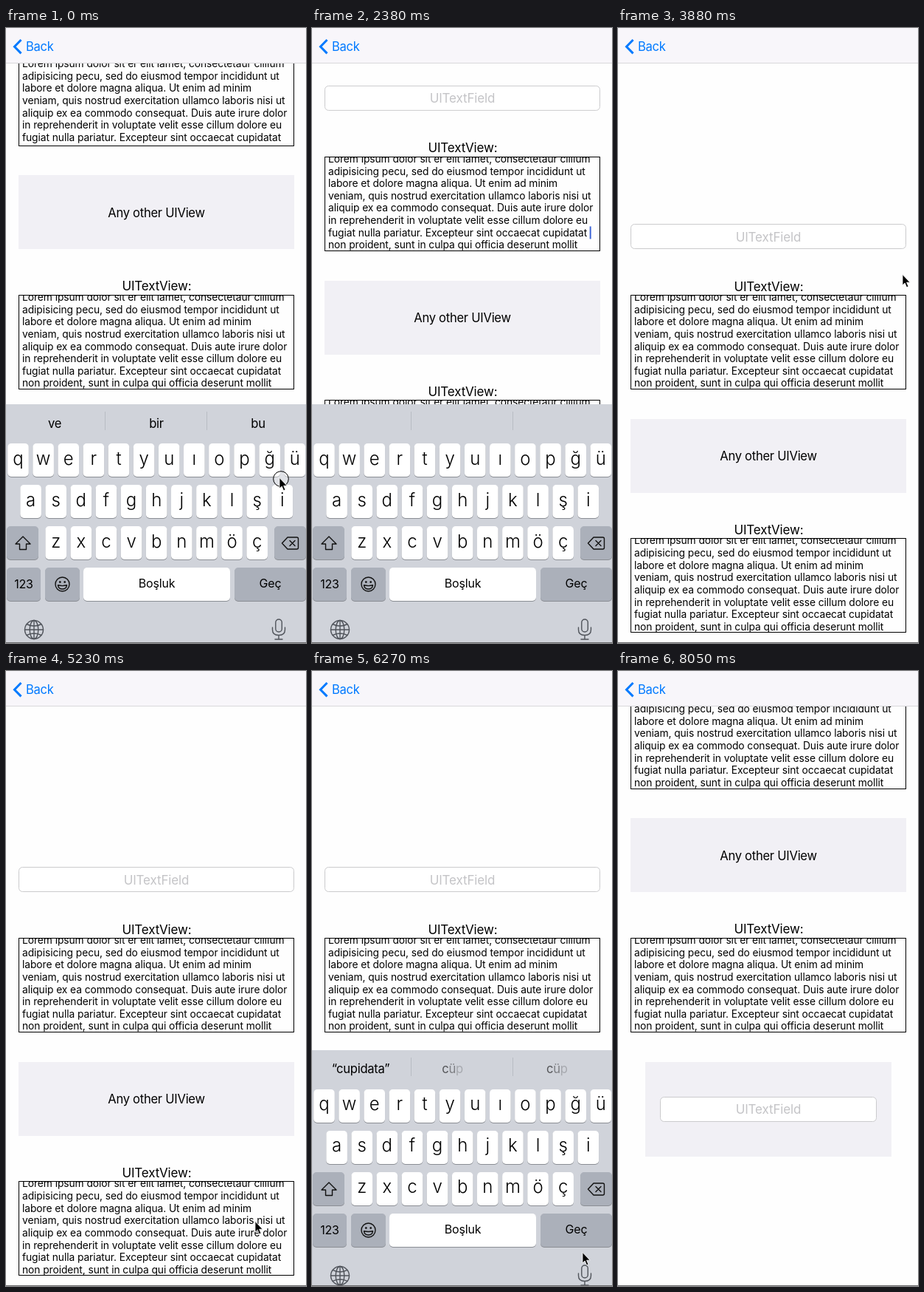
These frames come from a looping animation (407 px wide and 832 px high, 9.39 s). An HTML page:

```html
<!DOCTYPE html>
<html lang="en">
<head>
<meta charset="utf-8">
<style>
  html, body { margin: 0; width: 100%; height: 100%; overflow: hidden; background: #fefefe; }
  svg { display: block; width: 407px; height: 832px; font-family: Inter, Roboto, sans-serif; }
  .ui { font-size: 16.6px; letter-spacing: -.28px; }
  .label { font-size: 17px; letter-spacing: -.13px; }
  .body { font-size: 13.8px; letter-spacing: -.07px; }
  .cap { font-size: 24px; font-weight: 350; }
  .small { font-size: 16px; letter-spacing: -.15px; }
  .line { fill: none; stroke: #111; stroke-width: 1.4; stroke-linejoin: round; stroke-linecap: round; }
  .crisp { shape-rendering: crispEdges; }
</style>
</head>
<body>
<svg id="stage" viewBox="0 0 407 832"></svg>
<script>
const LOOP = 9390, STEPS = 63, PAGE_SHIFT = 329.4, KEYBOARD_HEIGHT = 323, INNER_SCROLL = 13.5;

const LINES = [
  'Lorem ipsum dolor sit er elit lamet, consectetaur cillium',
  'adipisicing pecu, sed do eiusmod tempor incididunt ut',
  'labore et dolore magna aliqua. Ut enim ad minim',
  'veniam, quis nostrud exercitation ullamco laboris nisi ut',
  'aliquip ex ea commodo consequat. Duis aute irure dolor',
  'in reprehenderit in voluptate velit esse cillum dolore eu',
  'fugiat nulla pariatur. Excepteur sint occaecat cupidatat',
  'non proident, sunt in culpa qui officia deserunt mollit'
];

const text = (x, y, s, cls, fill = '#000', anchor = 'middle') =>
  `<text x="${x}" y="${y}" class="${cls}" fill="${fill}" text-anchor="${anchor}">${s}</text>`;
const rect = (x, y, w, h, attrs) => `<rect x="${x}" y="${y}" width="${w}" height="${h}" ${attrs}/>`;

const textView = (id, y) => `
  ${text(204.5, y - 5.5, 'UITextView:', 'label')}
  <clipPath id="${id}Clip">${rect(18, y + .5, 372, 127, '')}</clipPath>
  <g clip-path="url(#${id}Clip)"><g id="${id}">
    ${LINES.map((s, i) => text(22, y + 8 + i * 16.63, s, 'body', '#000', 'start')).join('')}
    ${rect(376.7, y + 94.5, 2, 17, `id="${id}Caret" fill="#4068d8"`)}
  </g></g>
  ${rect(17.5, y + .5, 373, 127, 'class="crisp" fill="none" stroke="#000"')}`;

const textField = (x, y, w) =>
  rect(x, y, w, 33, 'rx="5" fill="#fff" stroke="#cbcbcd"') + text(204, y + 23, 'UITextField', 'label', '#c4c4c7');
const panel = (x, y, w, h) => rect(x, y, w, h, 'class="crisp" fill="#f1f0f5"');

const page = () => textField(17.5, 265.5, 373) + textView('first', 361) +
  panel(17, 528.7, 374, 100) + text(204, 585.3, 'Any other UIView', 'ui') +
  textView('second', 690.4) + panel(37, 858.4, 334, 128) + textField(57.5, 905.9, 293);

const key = (x, y, w, fill = '#fff') =>
  rect(x, y + 1, w, 45, 'rx="5" fill="#8b8e94"') + rect(x, y, w, 45, `rx="5" fill="${fill}"`);
const keyRow = (letters, firstCenter, y) => [...letters].map((c, i) => {
  const x = firstCenter + i * 34.12;
  return key(x - 14.3, y, 28.6) + text(x, y + 28.5, c, 'cap');
}).join('');

const keyboard = () => {
  const grey = '#abb0ba';
  return rect(0, 509, 407, 323, 'fill="#d0d3da"') +
    [134.5, 272.5].map(x => rect(x - .5, 519, 1, 25, 'fill="#b8bcc3"')).join('') +
    '<g id="words"></g>' +
    keyRow('qwertyuıopğü', 16.5, 562) + keyRow('asdfghjklşi', 33.6, 618) + keyRow('zxcvbnmöç', 67.7, 674) +
    key(1, 674, 43, grey) + key(364, 674, 43, grey) +
    key(1, 730, 46, grey) + key(53, 730, 47, grey) + key(105, 730, 199) + key(310, 730, 97, grey) +
    text(24, 758, '123', 'small') + text(204.5, 757, 'Boşluk', 'small') + text(358.5, 757, 'Geç', 'small') +
    `<path class="line" d="M23 688l10 10h-5.5v7.500h-9v-7.500h-5.500z"/>
     <path class="line" d="M382 689h12.500q2 0 2 2v12q0 2-2 2h-12.500l-7.500-8zM385 693.500l7 7m0-7l-7 7"/>
     <g class="line">
       <circle cx="76.500" cy="752.500" r="9.500"/>
       <path d="M70.500 753.800q6 1.600 12 0-.8 5.200-6 5.200t-6-5.200z"/>
     </g>
     <circle cx="73.300" cy="749.500" r="1.300"/><circle cx="79.700" cy="749.500" r="1.300"/>
     <g class="line" style="stroke:#50545b">
       <circle cx="38" cy="814" r="12.500"/><ellipse cx="38" cy="814" rx="5.800" ry="12.500"/>
       <path d="M38 801.500v25M25.500 814h25M28 806.500q10 5 20 0M28 821.500q10-5 20 0"/>
       <rect x="365.800" y="800" width="8.500" height="17" rx="4.200"/>
       <path d="M361.500 811v3q0 7.500 8.500 7.500t8.500-7.500v-3M370 821.500v5.500m-5 0h10"/>
     </g>`;
};

document.getElementById('stage').innerHTML =
  rect(0, 0, 407, 832, 'fill="#fefefe"') +
  `<g id="page">${page()}</g>` +
  rect(0, 0, 407, 47, 'fill="#f8f6fa"') + rect(0, 47, 407, 1, 'fill="#d9d8dc"') +
  '<path d="M20.500 16l-9 9.200 9 9.200" fill="none" stroke="#007aff" stroke-width="3"/>' +
  text(27, 31, 'Back', 'ui', '#007aff', 'start') +
  `<g id="keyboard">${keyboard()}</g>` + rect(0, 831, 407, 1, 'fill="#6a6a6c"') +
  `<g id="pointer">
     <circle id="press" cx="2" cy="1" r="10.300" fill="#fff" fill-opacity=".35" stroke="#000"/>
     <path d="M0 -.500v14.500l3.200-3 2.400 5.800 2.400-1-2.400-5.600h4.600z" stroke="#fff" stroke-width=".8"/>
   </g>`;

const el = id => document.getElementById(id);
const clamp = v => Math.max(0, Math.min(1, v));
const span = (k, a, b) => clamp((k - a) / (b - a));
const smooth = p => p * p * (3 - 2 * p);
const easeOut = p => 1 - (1 - p) ** 3;
const within = (k, a, b) => k >= a && k < b;
const show = (id, on) => el(id).setAttribute('display', on ? 'inline' : 'none');
const move = (id, x, y) => el(id).setAttribute('transform', `translate(${x} ${y})`);

// Pointer tip along each visit: [step, x, y]; a visit ends at its last step.
const VISITS = [
  [[0, 371, 609], [1, 371, 609], [3, 381, 480], [4, 385, 340], [5, 380, 230], [7, 369, 154], [9, 369, 158],
   [11, 369, 167], [13, 380, 150], [16, 380, 150]],
  [[22, 386, 334], [27, 386, 334]],
  [[31, 386, 311], [32, 370, 345], [33, 328, 460], [34, 306, 620], [35, 338, 745], [37, 371, 794],
   [39, 371, 794], [42, 367, 787], [43, 375, 690], [44, 386, 520], [45, 388, 424], [46, 390, 424],
   [48, 392, 421], [49, 395, 418], [54, 395, 418]]
];
const PRESSES = [[0, 1], [13, 15], [22, 24], [37, 39], [49, 52]];

function drawPointer(k) {
  const path = VISITS.find(v => within(k, v[0][0], v[v.length - 1][0]));
  show('pointer', path);
  if (!path) return;
  const i = path.findIndex(p => p[0] > k), a = path[i - 1], b = path[i];
  const p = span(k, a[0], b[0]);
  move('pointer', a[1] + (b[1] - a[1]) * p, a[2] + (b[2] - a[2]) * p);
  show('press', PRESSES.some(([from, to]) => within(k, from, to)));
}

// Suggestions appear letter by letter.
function drawWords(k) {
  const words = k < 30 ? ['ve', 'bir', 'bu'] : ['“cupidata”', 'cüppeli', 'cüppe'];
  el('words').innerHTML = words.map((word, n) => {
    const start = k < 15 ? -20 : k < 30 ? 17 : n ? 42 : 38;
    const letters = [...word].map((c, i) =>
      `<tspan fill-opacity="${clamp(.6 - .2 * i + (k - start) * .8)}">${c}</tspan>`).join('');
    return text(66 + n * 138, 540.5, letters, 'ui');
  }).join('');
}

function draw(ms) {
  const k = Math.floor((ms % LOOP + 5) * STEPS / LOOP) % STEPS;
  const scroll = 1 - smooth(span(k, 14.5, 17.8)) + smooth(span(k, 42, 45));
  const hidden = easeOut(span(k, 23.5, 26)) - easeOut(span(k, 40, 42.6)) + easeOut(span(k, 50.3, 53));
  move('page', 0, -PAGE_SHIFT * scroll);
  move('keyboard', 0, KEYBOARD_HEIGHT * hidden);
  move('first', 0, INNER_SCROLL * (1 - smooth(span(k, 13, 15))));
  show('firstCaret', within(k, 14, 23));
  show('secondCaret', within(k, 9, 14));
  drawWords(k);
  drawPointer(k);
}

const began = performance.now();
function tick() {
  draw(performance.now() - began);
  requestAnimationFrame(tick);
}
tick();
</script>
</body>
</html>
```
